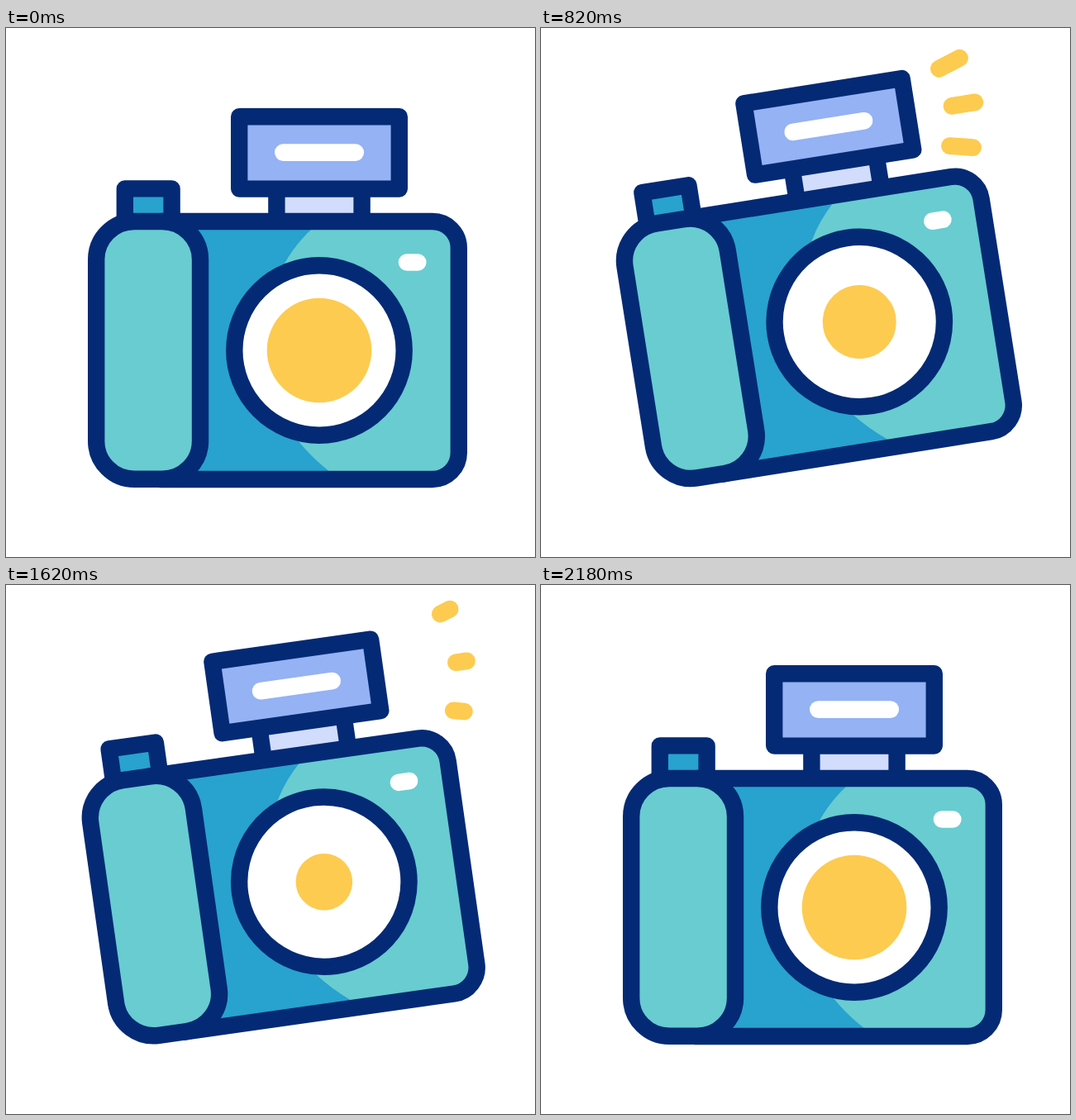
Recreate the animation shown at these times as an HTML page. Size 640 by 640 pixels, loop 2220 ms.

```html
<!DOCTYPE html>
<html lang="en">
<head>
<meta charset="utf-8">
<title>Camera</title>
<style>
  html, body { margin: 0; width: 100%; height: 100%; overflow: hidden; background: #fff; }
  svg { display: block; width: 100%; height: 100%; }
  .line { stroke: #042a75; stroke-width: 20.4; stroke-linecap: round; stroke-linejoin: round; fill: none; }
  .shine { stroke: #fff; stroke-width: 20.6; stroke-linecap: round; }
  .ray { stroke: #fdcb50; stroke-width: 20.8; stroke-linecap: round; }
  .teal { fill: #68ccd1; }
  .blue { fill: #28a2ce; }
</style>
</head>
<body>
<svg viewBox="0 0 640 640">
  <g id="camera">
    <path class="line" style="fill:#28a2ce" d="M143.8 236V194.4H200.6V236"/>
    <path fill="#d2dcfc" d="M327.4 196H430.6V234H327.4Z"/>
    <path class="line" d="M327.4 196V234M430.6 196V234"/>
    <rect class="line" style="fill:#94b2f4" x="282.2" y="107.2" width="193.6" height="87.4"/>
    <path class="shine" d="M335.3 150.6H422.8"/>

    <path class="blue" d="M188 234H400V546H188Z"/>
    <path class="teal" d="M369 244Q349 263 337 285L354 500Q370 520 392 537L400 546H515.8a32 32 0 0 0 32-32V266a32 32 0 0 0-32-32H378Z"/>
    <path class="line" d="M188 234H515.8a32 32 0 0 1 32 32V514a32 32 0 0 1-32 32H186"/>
    <rect class="line" style="fill:#68ccd1" x="109.2" y="234" width="125.8" height="311.8" rx="46"/>
    <path class="shine" d="M485 283.5H498.3"/>

    <circle class="line" style="fill:#fff" cx="379" cy="390" r="102.7"/>
    <circle id="pupil" cx="379" cy="390" r="63.3" fill="#fdcb50"/>
    <g id="rays"></g>
  </g>
</svg>
<script>
  const LOOP = 2220, TURN = 700, TURN_BACK = 1480, TILT = 9;
  const FLASHES = [697, 1292], HALF = 250;
  const PUPIL = 63.3, SHRINK = 0.6, RAY = 57;

  // Outer end of each ray and its slope in degrees
  const RAYS = [[576, 84.5, -18.5], [587.3, 149.5, 0], [575.7, 209.6, 13]];

  const camera = document.getElementById('camera');
  const pupil = document.getElementById('pupil');
  const rayGroup = document.getElementById('rays');

  const rays = RAYS.map(([x, y, deg]) => {
    const el = document.createElementNS('http://www.w3.org/2000/svg', 'line');
    el.setAttribute('class', 'ray');
    el.setAttribute('transform', `translate(${x} ${y}) rotate(${deg})`);
    el.setAttribute('y1', 0);
    el.setAttribute('y2', 0);
    rayGroup.append(el);
    return el;
  });

  function ease(t, start, length) {
    const s = Math.min(1, Math.max(0, (t - start) / length));
    return s * s * (3 - 2 * s);
  }

  function draw(t) {
    const tilt = TILT * (ease(t, 0, TURN) - ease(t, TURN_BACK, TURN));
    camera.setAttribute('transform', `rotate(${-tilt} 163 333)`);

    const start = t < FLASHES[1] ? FLASHES[0] : FLASHES[1];
    const u = t - start;
    const closed = ease(u, 0, HALF) - ease(u, HALF, HALF);
    pupil.setAttribute('r', PUPIL * (1 - SHRINK * closed));

    // The head runs outwards first, then the tail catches up
    const head = ease(u, 0, 250), tail = ease(u, 150, 260);
    const visible = u > 0 && u < 412;
    rayGroup.setAttribute('visibility', visible ? 'visible' : 'hidden');
    for (const el of rays) {
      el.setAttribute('x1', RAY * (tail - 1));
      el.setAttribute('x2', RAY * (head - 1) + 0.01);
    }
  }

  const begin = performance.now();
  function tick() {
    draw((performance.now() - begin) % LOOP);
    requestAnimationFrame(tick);
  }
  draw(0);
  requestAnimationFrame(tick);
</script>
</body>
</html>
```
